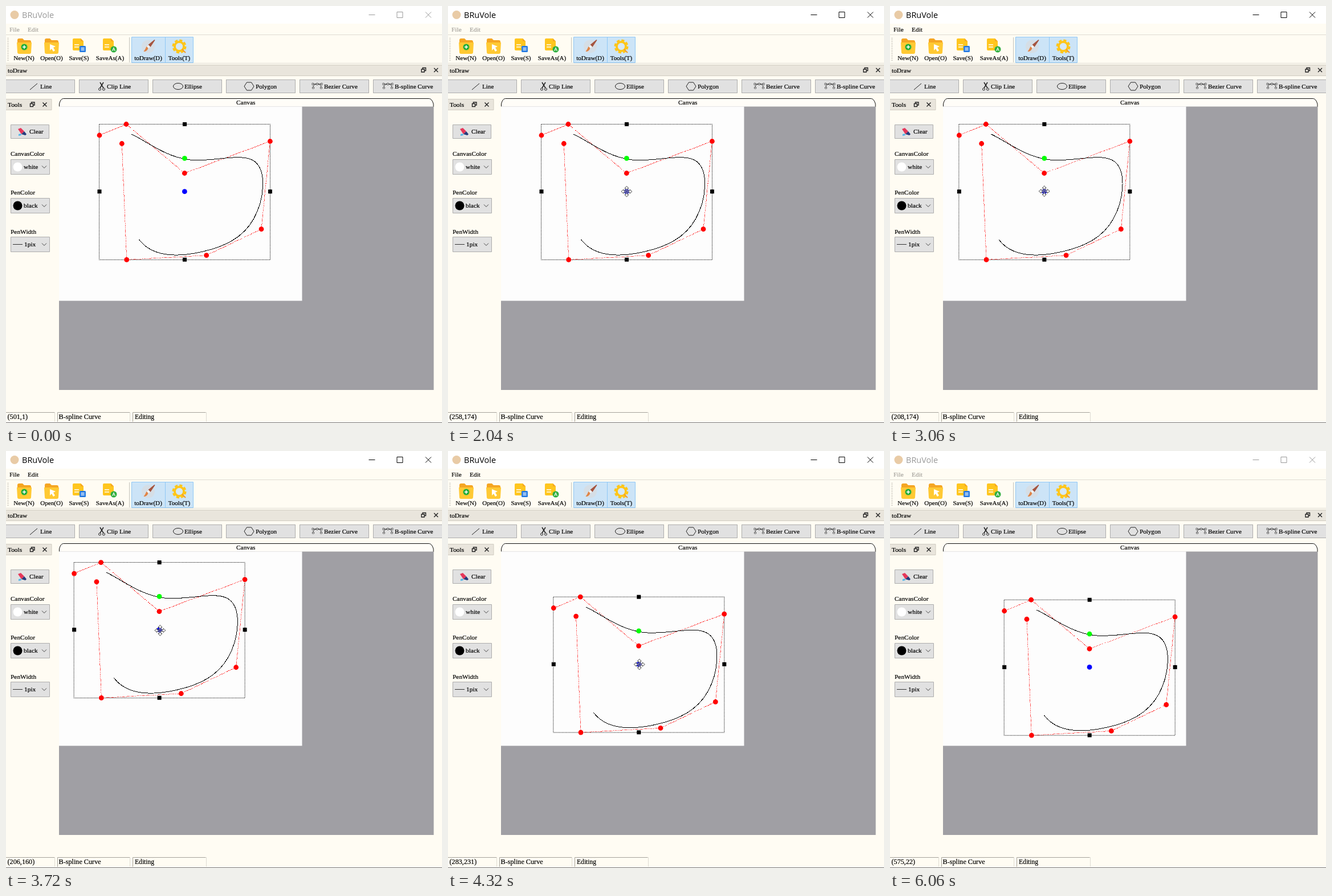
An HTML page for the animation above (6.24 s loop, 765 by 732 pixels).

```html
<!DOCTYPE html>
<html lang="en">
<meta charset="utf-8">
<title>Spline editor</title>
<style>
  html, body { margin: 0; width: 100%; height: 100%; overflow: hidden; background: #fffcf3; }
  svg { display: block; font: 11.1px "Liberation Serif", "Times New Roman", serif; }
  text { stroke: currentColor; stroke-width: .2; }
  .side { font-size: 11.4px; }
  .status { font-size: 12.2px; }
  .title { font: 14.5px "Open Sans", sans-serif; stroke: none; }
  .line { fill: none; stroke: #222; }
  .button { fill: #e1e1e1; stroke: #adadad; }
  .bar { fill: #e9e5dc; }
  .crisp { fill: none; shape-rendering: crispEdges; }
</style>
<svg width="765" height="732" viewBox="0 0 765 732" fill="currentColor">
  <defs>
    <g id="folder">
      <path fill="#f5a623" d="M-12-11q0-3 3-3h6l3 3h9q3 0 3 3v6h-24z"/>
      <path fill="#ffc933" d="M-13-7h26l-1 17q0 3-3 3H-9q-3 0-3-3z"/>
    </g>
    <g id="sheet">
      <path fill="#ffc61f" d="M-9-12q0-2 2-2H5l5 5V5q0 2-2 2H-7q-2 0-2-2z"/>
      <path stroke="#fff" stroke-width="1.6" d="M-6-3h8M-6 1h8"/>
      <path fill="#f5a623" d="M5-14l5 5H5z"/>
    </g>
    <g id="dockButtons" class="line" stroke-width="1.4">
      <path d="M-3.5-1.5h5v5h-5zM-1.5-1.5v-2.5h5.5v5h-2.5M18.5-3.5l7 7m0-7l-7 7"/>
    </g>
    <g id="nodes" class="line" stroke-width=".9">
      <path d="M-7 3C-7-1-4-3 0-3S7-1 7 3M-8-3H8"/>
      <path fill="#fff" d="M-9-4.500h2.500v3H-9zM6.500-4.500H9v3H6.500zM-1.300-4.500h2.600v3h-2.600zM-8.500 2.500h3v2.500h-3zM5.500 2.500h3v2.500h-3z" stroke-width=".7"/>
    </g>
  </defs>

  <rect width="765" height="31" fill="#fff"/>
  <circle cx="15" cy="15.500" r="7.500" fill="#e9cba6"/>
  <g id="caption">
    <text class="title" x="28" y="21">BRuVole</text>
    <path fill="none" stroke="currentColor" d="M636.500 15.500h11M686 10.500h10v10h-10zM736 10.500l10 10m0-10l-10 10"/>
  </g>
  <g id="menu" class="side"><text x="6" y="45">File</text><text x="38" y="45">Edit</text></g>

  <path stroke="#dedbd2" d="M0 50.500h765M0 100.500h765"/>
  <path stroke="#b5b2aa" stroke-dasharray="1 2" stroke-width="2" d="M3.500 56v42"/>
  <path stroke="#c8c5bc" d="M216.500 55v44"/>
  <path fill="#cce4f7" stroke="#90c8f6" d="M220.500 54.500h108v45h-108zM279.500 54.500v45"/>
  <g id="toolbar"></g>
  <g transform="translate(32 71)">
    <use href="#folder"/><circle cy="1" r="5.500" fill="#25ae3c"/>
    <path stroke="#fff" stroke-width="1.500" d="M-3 1h6M0-2v6"/>
  </g>
  <g transform="translate(80 71)">
    <use href="#folder"/><path fill="#fff" d="M-3-4l10 4-4 2 3 5-3 2-3-5-3 3z"/>
  </g>
  <g transform="translate(126 71)">
    <use href="#sheet"/><rect x="3" y="-1" width="11" height="11" rx="1.500" fill="#2a7de1"/>
    <path stroke="#fff" d="M5.500 2.500h6M5.500 4.500h6M5.500 6.500h6"/>
  </g>
  <g transform="translate(179 71)">
    <use href="#sheet"/><circle cx="10" cy="5" r="5.500" fill="#2fae3f"/>
    <path fill="none" stroke="#fff" d="M7.500 8l2.500-6 2.500 6M8.500 6h3"/>
  </g>
  <g transform="translate(249.500 71)">
    <circle r="11.500" fill="#d5dee6"/>
    <path fill="#a5543f" d="M11-12l1 1L4 1 0-3z"/>
    <path stroke="#f2f2f2" stroke-width="4" d="M2-1L-1 2"/>
    <path fill="#e08446" d="M-3 0l3 3q-2 6-8 6 3-4 5-9z"/>
  </g>
  <g transform="translate(304 71)" fill="none">
    <circle r="10.500" stroke="#ffc61a" stroke-width="4" stroke-dasharray="5 3.247"/>
    <circle r="8" stroke="#ffc61a" stroke-width="4"/>
    <circle r="6" fill="#d6e9f7"/>
    <path stroke="#f39c2d" stroke-width="2" d="M5 5l6 6"/>
  </g>

  <path class="bar" d="M0 104h765v18H0zM0 164h80v18H0z"/>
  <path fill="none" stroke="#d0ccc2" d="M0 103.500h765M0 122.500h765M0 163.500h80v19H0"/>
  <g class="side"><text x="3" y="117">toDraw</text><text x="3" y="177">Tools</text></g>
  <use href="#dockButtons" x="732.500" y="112.500"/>
  <use href="#dockButtons" x="46" y="173"/>

  <g id="tools"></g>
  <g class="line">
    <path d="M42 147l13-11M418 141l4.500-7h8l4.500 7-4.500 7h-8z"/>
    <path stroke-width="1.500" d="M165 134l6 10M171 134l-6 10"/>
    <circle cx="164.500" cy="146" r="2"/><circle cx="171.500" cy="146" r="2"/>
    <ellipse cx="302" cy="141" rx="8.500" ry="5.500"/>
  </g>
  <use href="#nodes" x="546" y="140"/><use href="#nodes" x="670" y="140"/>

  <path class="button" d="M8.500 208.500h67v24h-67zM8.500 269.500h68v26h-68zM8.500 337.500h68v26h-68zM8.500 405.500h68v26h-68z"/>
  <path fill="#e6375a" d="M21 216l5-2 6 6-5 5z"/>
  <path fill="#263b7b" d="M27 225l5-5 4 5-2 2z"/>
  <path fill="#55b8e8" d="M22 225l4-1 1 3-5 1z"/>
  <circle cx="20.500" cy="282.500" r="8" fill="#fff"/>
  <circle cx="20.500" cy="350.500" r="8"/>
  <path stroke="#333" d="M12 418.500h17"/>
  <path fill="none" stroke="#444" d="M63 280.500l4 4 4-4M63 348.500l4 4 4-4M63 416.500l4 4 4-4"/>
  <g id="sideText" class="side"></g>

  <path fill="#fffdf8" stroke="#111" d="M93.500 177v-5q2-9 7-9.500h642q5 .5 7.500 9.500v5"/>
  <text class="side" x="404" y="173">Canvas</text>
  <path fill="#a09fa4" d="M93 176.500h657.500V674H93z"/>
  <path fill="#fdfdfd" d="M93 176.500h426.500v341H93z"/>

  <g id="shape">
    <path id="hull" class="crisp" stroke="red" stroke-dasharray="1.200 1.500"/>
    <rect x="163.500" y="207.500" width="300" height="238" fill="none" stroke="#000" stroke-dasharray="1.300 1.300"/>
    <path id="curve" class="crisp" stroke="#000"/>
    <g id="handles"></g>
  </g>

  <path fill="none" stroke="#a5a29b" d="M0 713.500h85M90.500 730v-16.500h127M222.500 730v-16.500h128"/>
  <path fill="none" stroke="#dedbd3" d="M85.500 713v17M217.500 713v17M351.500 713v17"/>
  <path stroke="#77757a" d="M0 731.500h765"/>
  <g class="status">
    <text id="coords" x="2.500" y="725"></text>
    <text x="92.500" y="725">B-spline Curve</text>
    <text x="226" y="725" font-size="11.600">Editing</text>
  </g>

  <g id="cursor">
    <g id="moveCursor">
      <path fill="#fff" stroke="#222" stroke-width=".8" d="M0-9.500l3.500 4h-2v4h4v-2l4 3.500-4 3.500v-2h-4v4h2l-3.500 4-3.500-4h2v-4h-4v2l-4-3.500 4-3.500v2h4v-4h-2z"/>
      <path fill="none" stroke="#1c1c96" stroke-width="1.400" d="M-4 0h8M0-4v8"/>
    </g>
    <path id="arrowCursor" fill="#fff" stroke="#000" d="M.5.5v15l3.500-3.300 2.400 5.300 2.200-1-2.400-5.200h4.800z"/>
  </g>
</svg>
<script>
const $ = id => document.getElementById(id);
const SCALE = 0.853, CANVAS_X = 93.4, CANVAS_Y = 177.2, LOOP = 6240, STEP = 60;
const START = [258, 174];

const label = (x, y, s, attrs = '') => `<text x="${x}" y="${y}" ${attrs}>${s}</text>`;

$('toolbar').innerHTML = [['New(N)', 31.5], ['Open(O)', 80], ['Save(S)', 128], ['SaveAs(A)', 182.5], ['toDraw(D)', 249.5], ['Tools(T)', 304]]
  .map(([s, x]) => label(x, 95, s, 'text-anchor="middle"')).join('');

$('tools').innerHTML = [['Line', 60], ['Clip Line', 177], ['Ellipse', 313], ['Polygon', 438], ['Bezier Curve', 558], ['B-spline Curve', 682]]
  .map(([s, x], i) => `<rect class="button" x="${i * 129 - .5}" y="129.5" width="121" height="23"/>` + label(x, 145, s)).join('');

$('sideText').innerHTML = [['Clear', 41, 224], ['CanvasColor', 8, 263], ['white', 31, 286], ['PenColor', 8, 331], ['black', 31, 354], ['PenWidth', 8, 400], ['1pix', 32, 422]]
  .map(([s, x, y]) => label(x, y, s)).join('');

// Control polygon and its uniform cubic B-spline, drawn as Bezier pieces
const points = [[164, 227], [211, 207.5], [313.3, 293.5], [463.4, 237.5], [448, 391.7], [351.7, 437.7], [211.7, 445.4], [203.3, 241.5]];
const mix = (a, wa, b, wb, c = a, wc = 0) => a.map((v, i) => (v * wa + b[i] * wb + c[i] * wc) / (wa + wb + wc));
let spline = 'M' + mix(points[0], 1, points[1], 4, points[2], 1);
for (let i = 1; i < points.length - 2; i++) {
  const [p, q, r] = points.slice(i, i + 3);
  spline += `C${mix(p, 2, q, 1)} ${mix(p, 1, q, 2)} ${mix(p, 1, q, 4, r, 1)}`;
}
$('curve').setAttribute('d', spline);
$('hull').setAttribute('d', 'M' + points.join('L'));

const dot = ([x, y], color) => `<circle cx="${x}" cy="${y}" r="4.4" fill="${color}"/>`;
$('handles').innerHTML = points.map(p => dot(p, 'red')).join('')
  + [[313.5, 207.5], [164, 325.7], [463.5, 325.7], [313.5, 445.2]].map(([x, y]) => `<rect x="${x - 3.5}" y="${y - 3.5}" width="7" height="7"/>`).join('')
  + dot([313.4, 267.3], '#0f0') + dot([313.4, 325.7], '#00f');

// Pointer track: time, x, y in canvas units
const track = [
  [300, 579, -14], [900, 264, 183], [1500, 258, 174], [2220, 258, 174],
  [2700, 232, 186], [2880, 220, 183], [3060, 208, 174], [3480, 202, 153], [3600, 202, 153],
  [3720, 206, 160], [4260, 274, 227], [4320, 283, 231], [4500, 301, 237], [4920, 301, 237],
  [4980, 385, 168], [5040, 575, 22], [5100, 748, -116]
];
function pointerAt(t) {
  const i = track.findIndex(k => k[0] >= t);
  if (i < 1) return track.at(i).slice(1);
  const [t0, x0, y0] = track[i - 1], [t1, x1, y1] = track[i];
  const k = (t - t0) / (t1 - t0);
  return [x0 + (x1 - x0) * k, y0 + (y1 - y0) * k];
}

const show = (id, on) => $(id).setAttribute('visibility', on ? 'visible' : 'hidden');
const move = (id, x, y) => $(id).setAttribute('transform', `translate(${x} ${y})`);

function draw(now) {
  const t = Math.floor(now % LOOP / STEP) * STEP;
  const dragTime = Math.min(Math.max(t, 2220), 4500);
  const center = pointerAt(dragTime).map(Math.round);
  move('shape', (center[0] - START[0]) * SCALE, (center[1] - START[1]) * SCALE);

  const dragging = t > 2220 && t < 4500;
  const [x, y] = pointerAt(t + (dragging ? 12 : 0));
  const present = t >= 300 && t < 5160;
  const overCenter = present && Math.hypot(x - center[0], y - center[1]) < 13;
  move('cursor', CANVAS_X + x * SCALE, CANVAS_Y + y * SCALE);
  show('moveCursor', overCenter);
  show('arrowCursor', present && !overCenter);

  const idle = t < 1000 ? [501, 1] : [575, 22];
  const read = present && y >= 0 ? pointerAt(t).map(Math.round) : idle;
  $('coords').textContent = `(${read})`;

  const active = t >= 2040 && t < 6060;
  $('caption').setAttribute('color', active ? '#000' : '#999');
  $('menu').setAttribute('color', active && t >= 2100 ? '#000' : '#a3a19b');
}

const begin = performance.now();
(function tick() {
  draw(performance.now() - begin);
  requestAnimationFrame(tick);
})();
</script>
</html>
```
